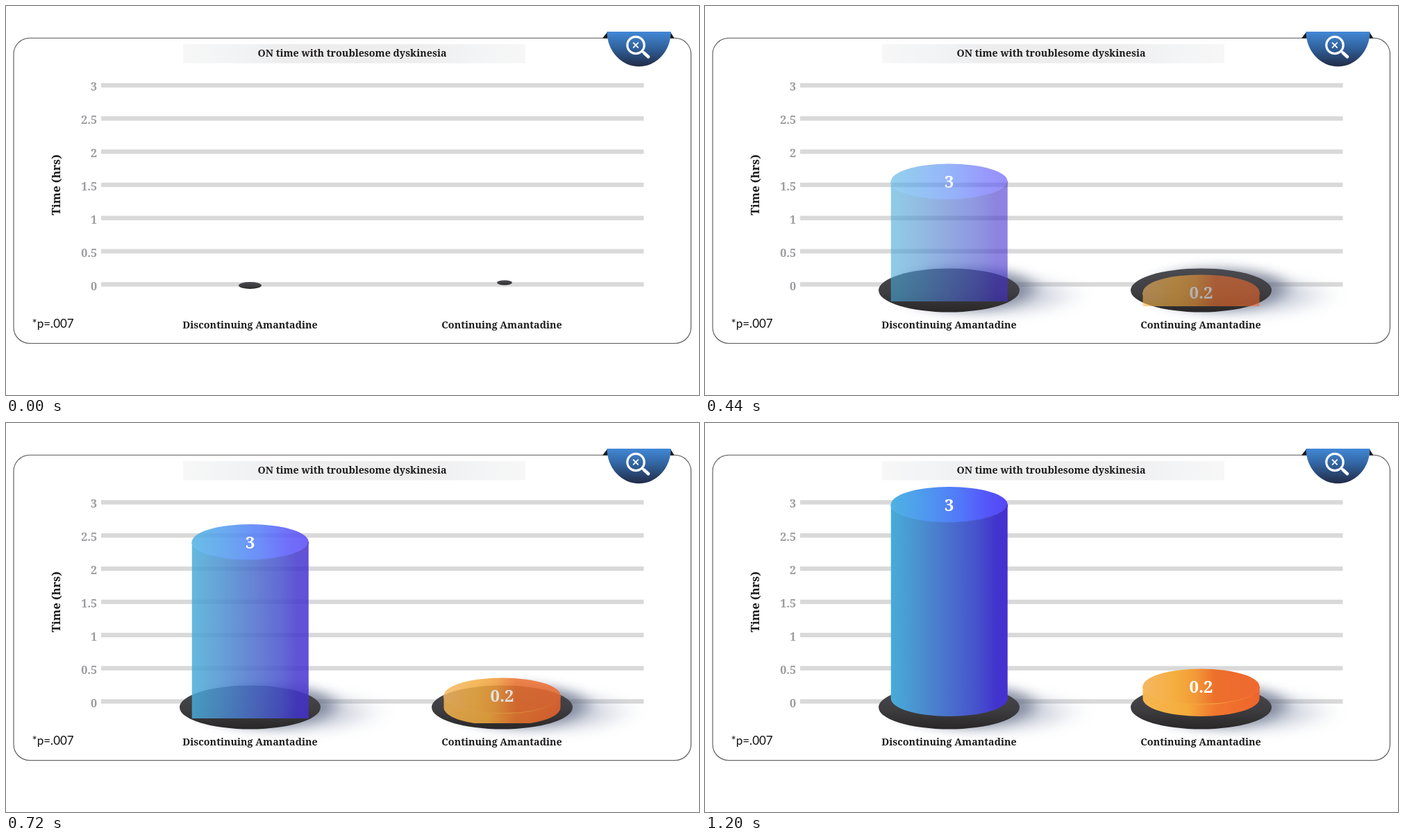
Recreate the animation shown at these times as an HTML page. Size 998 px wide and 561 px high, loop 8000 ms.

```html
<!DOCTYPE html>
<html lang="en">
<head>
<meta charset="utf-8">
<title>ON time with troublesome dyskinesia</title>
<style>
html, body { margin: 0; width: 100%; height: 100%; overflow: hidden; background: #fff; }
svg { display: block; width: 100vw; height: 100vh; }
text { font-family: "Noto Serif", serif; font-weight: bold; fill: #1d1b1c; }
.mid { text-anchor: middle; font-size: 14.3px; }
.tick { text-anchor: end; font-size: 16.2px; fill: #9c9b9f; }
.value { text-anchor: middle; font-size: 24px; fill: #fff; }
.note { font: 17px Lato, sans-serif; fill: #111; }
</style>
</head>
<body>
<svg viewBox="0 0 998 561" xmlns="http://www.w3.org/2000/svg">
  <defs>
    <linearGradient id="band">
      <stop offset="0" stop-color="#f7f7f7"/>
      <stop offset=".16" stop-color="#f1f3f5"/>
      <stop offset=".3" stop-color="#ededee"/>
      <stop offset=".7" stop-color="#eeeeef"/>
      <stop offset=".86" stop-color="#f3f4f5"/>
      <stop offset="1" stop-color="#f7f7f7"/>
    </linearGradient>
    <linearGradient id="badge" x2="0" y2="1">
      <stop offset="0" stop-color="#4288d6"/>
      <stop offset=".45" stop-color="#31639f"/>
      <stop offset="1" stop-color="#212b47"/>
    </linearGradient>
    <linearGradient id="dark" x2="0" y2="1">
      <stop offset="0" stop-color="#4a4b51"/>
      <stop offset=".55" stop-color="#3e3d40"/>
      <stop offset="1" stop-color="#292727"/>
    </linearGradient>
    <linearGradient id="blueTop">
      <stop offset="0" stop-color="#4eb2e2"/>
      <stop offset=".3" stop-color="#4f98ef"/>
      <stop offset=".6" stop-color="#5277f9"/>
      <stop offset=".8" stop-color="#5558fa"/>
      <stop offset="1" stop-color="#5546f6"/>
    </linearGradient>
    <linearGradient id="blueBody">
      <stop offset="0" stop-color="#48abd9"/>
      <stop offset=".25" stop-color="#4a90cf"/>
      <stop offset=".5" stop-color="#4a70cd"/>
      <stop offset=".75" stop-color="#4650cc"/>
      <stop offset=".9" stop-color="#4234cd"/>
      <stop offset="1" stop-color="#4530d2"/>
    </linearGradient>
    <linearGradient id="blueRim">
      <stop offset="0" stop-color="#4ab6ec"/>
      <stop offset=".5" stop-color="#4a7be8"/>
      <stop offset="1" stop-color="#3a28b0"/>
    </linearGradient>
    <linearGradient id="orangeTop">
      <stop offset="0" stop-color="#f6b764"/>
      <stop offset=".28" stop-color="#f5ae3e"/>
      <stop offset=".45" stop-color="#f29a38"/>
      <stop offset=".62" stop-color="#ec6f2c"/>
      <stop offset="1" stop-color="#ef6930"/>
    </linearGradient>
    <linearGradient id="orangeBody">
      <stop offset="0" stop-color="#f7b651"/>
      <stop offset=".38" stop-color="#f5ac3b"/>
      <stop offset=".62" stop-color="#f0772e"/>
      <stop offset="1" stop-color="#ee642c"/>
    </linearGradient>
    <linearGradient id="orangeRim">
      <stop offset="0" stop-color="#f8c04e"/>
      <stop offset=".6" stop-color="#f7a23c"/>
      <stop offset="1" stop-color="#f2652e"/>
    </linearGradient>
    <filter id="soft" x="-50%" y="-100%" width="200%" height="300%"><feGaussianBlur stdDeviation="12 8"/></filter>
    <filter id="wide" x="-50%" y="-100%" width="200%" height="300%"><feGaussianBlur stdDeviation="24 9"/></filter>
    <clipPath id="blueClip"><rect x="200" y="60" width="300" height="366"/></clipPath>
    <clipPath id="orangeClip"><rect x="560" y="60" width="300" height="373"/></clipPath>
  </defs>
  <rect width="998" height="561" fill="#fff"/>
  <rect x="11" y="46.3" width="975.5" height="440.2" rx="23" fill="none" stroke="#555457" stroke-width="1.1"/>
  <rect x="255" y="55" width="493" height="27.5" fill="url(#band)"/>
  <text class="mid" x="498.5" y="73">ON time with troublesome dyskinesia</text>

  <path d="M859 46.6L866.5 37V46.6ZM962.5 46.6L956.5 37V46.6Z" fill="#191a22"/>
  <path d="M865.5 37H957.5A46 50.3 0 0 1 865.5 37Z" fill="url(#badge)"/>
  <g fill="none" stroke="#fff" stroke-linecap="round">
    <circle cx="907" cy="56.5" r="12.2" stroke-width="3.2"/>
    <path d="M903.6 53.2l6.6 6.6m0-6.6l-6.6 6.6" stroke-width="1.9"/>
    <path d="M916 65.2l3 2.6" stroke-width="3"/>
    <path d="M919 67.8l6 5.4" stroke-width="4.6"/>
  </g>

  <g id="grid"></g>
  <text x="0" y="0" font-size="16.5" text-anchor="middle" transform="translate(77.5 258) rotate(-90)">Time (hrs)</text>
  <text class="note" x="37.5" y="464">*p=.007</text>
  <text class="mid" x="351.5" y="465">Discontinuing Amantadine</text>
  <text class="mid" x="714" y="465">Continuing Amantadine</text>
  <g id="chart"></g>
</svg>
<script>
const LOOP = 8000, STEP = 40, RISE = 1200, GROW = 280;
const RX = 84, RY = 25.5, FOOT = 397.5;
const $ = id => document.getElementById(id);
const mix = (a, b, k) => a + (b - a) * k;
const easeOut = p => 1 - (1 - Math.min(1, p)) ** 2;

const bars = [
  { hue: "blue", x: 351.75, top: 117.5, rise: 338, label: "3",
    disc: { x: 351.5, fromX: 351.5, fromY: 403, scale: 0.162 } },
  { hue: "orange", x: 714.5, top: 380, rise: 82, label: "0.2",
    disc: { x: 714.5, fromX: 718, fromY: 399, scale: 0.108 } }
];

function gridRow(i) {
  const y = 114.4 + i * 47.85;
  return `<rect x="137" y="${y - 3.2}" width="781.5" height="6.4" fill="#d9d9d9"/>
    <text class="tick" x="131" y="${121.7 + i * 48}">${3 - i / 2}</text>`;
}

function discMarkup({ hue }) {
  return `<g id="${hue}Disc">
    <g id="${hue}Shadow">
      <ellipse cx="62" cy="7" rx="104" ry="27" fill="#8793ad" opacity=".38" filter="url(#wide)"/>
      <ellipse cx="25" cy="-2" rx="98" ry="30" fill="#59627c" opacity=".62" filter="url(#soft)"/>
    </g>
    <ellipse rx="101.5" ry="31.5" fill="url(#dark)"/>
  </g>`;
}

function barMarkup({ hue, x, top, label }) {
  const l = x - RX, r = x + RX;
  const front = `M${l} ${top}A${RX} ${RY} 0 0 0 ${r} ${top}`;
  return `<g clip-path="url(#${hue}Clip)"><g id="${hue}Bar">
    <path d="${front}V${FOOT}A${RX} ${RY} 0 0 1 ${l} ${FOOT}Z" fill="url(#${hue}Body)"/>
    <ellipse cx="${x}" cy="${top}" rx="${RX}" ry="${RY}" fill="url(#${hue}Top)"/>
    <path d="${front}" fill="none" stroke="url(#${hue}Rim)" stroke-width="1.2"/>
    <text class="value" x="${x}" y="${top + 9}">${label}</text>
  </g></g>`;
}

$("grid").innerHTML = [0, 1, 2, 3, 4, 5, 6].map(gridRow).join("");
$("chart").innerHTML = bars.map(b => discMarkup(b) + barMarkup(b)).join("");

function draw(ms) {
  const t = Math.floor((ms % LOOP) / STEP) * STEP;
  const up = easeOut(t / RISE), grow = easeOut(t / GROW);
  for (const { hue, rise, disc } of bars) {
    const x = mix(disc.fromX, disc.x, grow), y = mix(disc.fromY, 410, grow);
    $(hue + "Disc").setAttribute("transform", `translate(${x} ${y}) scale(${mix(disc.scale, 1, grow)})`);
    $(hue + "Shadow").setAttribute("opacity", grow);
    $(hue + "Bar").setAttribute("transform", `translate(0 ${rise * (1 - up)})`);
    $(hue + "Bar").setAttribute("opacity", up);
  }
}

let start;
function tick(now) {
  start ??= now;
  draw(now - start);
  requestAnimationFrame(tick);
}
draw(0);
requestAnimationFrame(tick);
</script>
</body>
</html>
```
